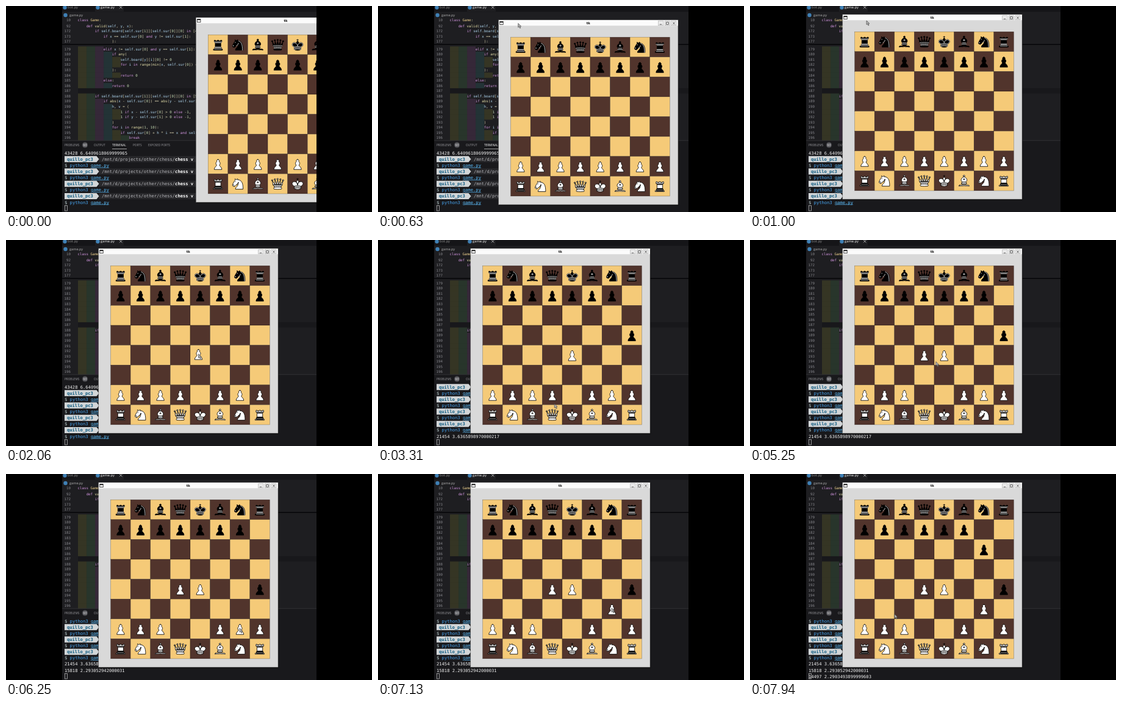
These frames come from a looping animation (600x338 px, 8 s). An HTML page:

```html
<!DOCTYPE html>
<html lang="en">
<head>
<meta charset="utf-8">
<title>Chess in a tk window</title>
<style>
  html, body { margin: 0; width: 100%; height: 100%; overflow: hidden; background: #000; }
  svg { display: block; width: 100vw; height: 100vh; }
  text { white-space: pre; }
  .code { font: 5.8px "DejaVu Sans Mono", monospace; }
  .term { font: 7.13px "DejaVu Sans Mono", monospace; }
  .ui { font-family: "Open Sans", sans-serif; }
</style>
</head>
<body>
<svg id="stage" viewBox="0 0 600 338">
  <clipPath id="screen"><rect x="92" width="417" height="338"/></clipPath>
  <clipPath id="panel"><rect x="92" y="236" width="417" height="102"/></clipPath>
  <g clip-path="url(#screen)">
    <g id="editor"></g>
    <g id="terminal" clip-path="url(#panel)"></g>
    <g id="win"></g>
    <path id="mouse" d="M0 0V6.6L1.6 5.2 2.9 8 4 7.5 2.8 4.8H4.9Z" fill="#b4b4b4" stroke="#4a4a4a" stroke-width=".7"/>
  </g>
</svg>
<script>
const LOOP = 8000;
const CELL = 32.6;
const $ = id => document.getElementById(id);
const rect = (x, y, w, h, fill, extra = '') =>
  `<rect x="${x}" y="${y}" width="${w}" height="${h}" fill="${fill}" ${extra}/>`;
const text = (x, y, s, fill, extra = '') =>
  `<text x="${x}" y="${y}" fill="${fill}" ${extra}>${s}</text>`;
const esc = s => s.replace(/&/g, '&amp;').replace(/</g, '&lt;').replace(/>/g, '&gt;');

/* Editor */
const STICKY = [
  [10, 0, 'class Game:'],
  [92, 4, 'def valid(self, y, x):'],
  [172, 8, 'if self.board[self.sur[1]][self.sur[0]][0] in [4, 5]:'],
  [173, 12, 'if x == self.sur[0] and y != self.sur[1]:'],
  [177, 16, '):']
];
const CODE = [
  [12, 'elif x != self.sur[0] and y == self.sur[1]:'],
  [16, 'if any('],
  [20, 'self.board[y][i][0] != 0'],
  [20, 'for i in range(min(x, self.sur[0]) + 1, 9)'],
  [16, '):'],
  [20, 'return 0'],
  [12, 'else:'],
  [16, 'return 0'],
  [0, ''],
  [8, 'if self.board[self.sur[1]][self.sur[0]][0] in [5, 3]:'],
  [12, 'if abs(x - self.sur[0]) == abs(y - self.sur[1]):'],
  [16, 'h, v = ('],
  [20, '1 if x - self.sur[0] > 0 else -1,'],
  [20, '1 if y - self.sur[1] > 0 else -1,'],
  [16, ')'],
  [16, 'for i in range(1, 10):'],
  [20, 'if self.sur[0] + h * i == x and self.sur[1]:'],
  [24, 'break']
];
const INDENT = ['255,255,64', '127,255,127', '255,127,255', '79,236,236'];

function tokenColor(s) {
  if (/^(class|def|if|elif|else|for|in|and|return|break)$/.test(s)) return '#cf93dc';
  if (/^(valid|any|range|min|abs)$/.test(s)) return '#e2dda8';
  if (s === 'Game') return '#ecd08c';
  if (/^\d/.test(s)) return '#c6dcb4';
  if (/^\w/.test(s)) return '#b0d6ee';
  return '#e0d8b4';
}
const paint = s => (s.match(/\w+|\s+|[^\w\s]+/g) || [])
  .map(k => `<tspan fill="${tokenColor(k)}">${esc(k)}</tspan>`).join('');

function codeLine(n, col, s, y) {
  return text(106, y + 2, n, '#85858a', 'class="code" text-anchor="end"') +
    text(117.6 + col * 3.51, y + 2, paint(s), '#ccc', 'class="code"');
}

function buildEditor() {
  const dot = (x, y) => `<circle cx="${x}" cy="${y}" r="3.2" fill="#3f80b5"/>`;
  let s = rect(92, 0, 417, 338, '#1e1e21') + rect(92, 0, 417, 9.5, '#151518') +
    rect(146, 0, 47, 9.5, '#1e1e21') + dot(96.5, 2.5) + dot(150.5, 2.5) + dot(97.5, 15) +
    text(101, 4.3, 'bot.py', '#8c8c8c', 'class="ui" font-size="5.8"') +
    text(155, 4.3, 'game.py', '#f0f0f0', 'class="ui" font-size="5.8"') +
    '<path d="M186 0l4.4 4.4M190.4 0L186 4.4" stroke="#ddd" stroke-width=".7"/>' +
    text(104, 17, 'game.py', '#b0b0b0', 'class="ui" font-size="5.6"');
  STICKY.forEach(([n, col, code], i) => {
    s += codeLine(n, col, code, i ? 24 + i * 8.5 : 23);
  });
  s += rect(92, 62.3, 417, 1.7, '#08080a');
  CODE.forEach(([col, code], i) => {
    const y = 70.6 + i * 8.58;
    for (let k = 0; k < col / 4; k++)
      s += rect(118 + k * 14.04, y - 4.3, 14.04, 8.6, `rgba(${INDENT[k % 4]},.1)`);
    if (!code) s += rect(118, y - 4.3, 391, 8.6, '#18181b');
    s += codeLine(179 + i, col, code, y);
  });
  s += rect(92, 221, 417, 117, '#19191c') + rect(92, 220.5, 417, .7, '#38383c');
  [[96, 'PROBLEMS'], [144, 'OUTPUT'], [174, 'TERMINAL'], [208, 'PORTS'], [233, 'EXPOSED PORTS']]
    .forEach(([x, label]) => {
      s += text(x, 230.2, label, label === 'TERMINAL' ? '#fff' : '#9c9ca0', 'class="ui" font-size="4.7"');
    });
  s += '<circle cx="129.5" cy="228" r="4.6" fill="#55555a"/>' +
    text(129.5, 229.8, '63', '#fff', 'class="ui" font-size="4.8" text-anchor="middle"') +
    rect(174, 234.2, 24, .7, '#d8d8d8');
  $('editor').innerHTML = s;
}

/* Terminal */
const prompt = y => rect(152, y - 5, 170, 10, '#28282b') +
  `<path d="M96 ${y - 5}H148.5L152.5 ${y}L148.5 ${y + 5}H96Z" fill="#d2d6d8"/>` +
  text(100, y + 2.4, 'quillo_pc3', '#0e5a80', 'font-weight="700"') +
  text(157, y + 2.4, '/mnt/d/projects/other/chess/<tspan fill="#fff" font-weight="700">chess v</tspan>', '#b4b4b8');
const command = y => text(96, y + 2.5,
  '$ <tspan fill="#46a4f0">python3</tspan> <tspan fill="#5cbcf8" text-decoration="underline">game.py</tspan>', '#b4c6c6');
const output = s => y => text(96, y + 2.5, s, '#f0f0f0');

const LINES = [
  output('43428 6.6409618069999965'),
  prompt, command, prompt, command, prompt, command, prompt, command,
  output('21454 3.6365898970000217'),
  output('15818 2.293052942000031'),
  output('14497 2.2903493899999603')
];
const REPLIES = [3150, 5480, 7900];
let shown = -1;

function drawTerminal(t) {
  const n = REPLIES.filter(r => t >= r).length;
  if (n === shown) return;
  shown = n;
  const first = Math.min(n, 2);
  $('terminal').innerHTML = '<g class="term">' +
    LINES.slice(first, 9 + n).map((line, i) => line(241.2 + i * 10.1)).join('') + '</g>' +
    rect(96.4, 327.6, 4, 8.4, 'none', 'stroke="#c8c8c8" stroke-width=".7"');
}

/* Chess pieces, each in a 45 unit box */
const shapes = {};
const piece = (name, body, detail = '') => { shapes[name] = { body, detail }; };
const ball = (x, y, r) => `M${x - r} ${y}a${r} ${r} 0 1 1 ${2 * r} 0a${r} ${r} 0 1 1 ${-2 * r} 0z`;

piece('p', 'M22.5 9c-2.2 0-4 1.8-4 4 0 .9.3 1.7.8 2.4C17.3 16.5 16 18.6 16 21c0 2 .9 3.8 2.4 5C17.6 30.5 11 32 11 39.5H34c0-7.5-6.6-9-7.4-13.5C28.1 24.8 29 23 29 21c0-2.4-1.3-4.5-3.3-5.6.5-.7.8-1.5.8-2.4 0-2.2-1.8-4-4-4z');
piece('r', 'M9 39h27v-3H9zM12 36v-4h21v4zM12.5 32l1.5-2.5h17l1.5 2.5zM14 29.5V17h17v12.5zM14 17l-3-3V9h4v2h5V9h5v2h5V9h4v5l-3 3z',
  'M12 35.5h21M13 31.5h19M14 29.5h17M14 16.5h17M11 14h23');
piece('n', 'M22 10c10.5 1 16.5 8 16 29H15c0-9 10-6.5 8-21L24 18c.4 2.9-5.5 7.4-8 9-3 2-2.8 4.3-5 4-1-1 1.4-3 0-3-1 0 .2 1.2-1 2-1 0-4 1-4-4 0-2 6-12 6-12s1.9-1.9 2-3.5c-.7-1-.5-2-.5-3 1-1 3 2.5 3 2.5h2s.8-2 2.5-3c1 0 1 3 1 3z',
  ball(9, 25.5, .5) + 'M15 15l-.8 1.3M24 18c.3 2.5-3 5.5-6 7.6');
piece('b', 'M9 36c3.4-1 10 .4 13.5-2 3.4 2.4 10 1 13.5 2 0 0 1.6.5 3 2-.7 1-1.6 1-3 .5-3.4-1-10 .5-13.5-1-3.4 1.5-10 0-13.5 1-1.3.5-2.3.5-3-.5 1.3-1.5 3-2 3-2zM15 32c2.5 2.5 12.5 2.5 15 0 .5-1.5 0-2 0-2 0-2.5-2.5-4-2.5-4 5.5-1.5 6-11.5-5-15.5-11 4-10.5 14-5 15.5 0 0-2.5 1.5-2.5 4 0 0-.5.5 0 2z' + ball(22.5, 8, 2.5),
  'M17.5 26h10M15 30h15M22.5 15.5v5M20 18h5');
piece('q', 'M9 26c8.5-1.5 21-1.5 27 0l2.5-12.5L31 25l-.3-14.1-5.2 13.6-3-14.5-3 14.5-5.2-13.6L14 25 6.5 13.5zM9 26c0 2 1.5 2 2.5 4 1 1.5 1 1 .5 3.5-1.5 1-1 2.5-1 2.5-1.5 1.5 0 2.5 0 2.5 6.5 1 16.5 1 23 0 0 0 1.5-1 0-2.5 0 0 .5-1.5-1-2.5-.5-2.5-.5-2 .5-3.5 1-2 2.5-2 2.5-4-8.5-1.5-18.5-1.5-27 0z' +
  ball(6, 12, 2) + ball(14, 9, 2) + ball(22.5, 8, 2) + ball(31, 9, 2) + ball(39, 12, 2),
  'M9 26c8.5-1.5 18.5-1.5 27 0M11.5 30c3.5-1 18.5-1 22 0M12 33.5c6-1 15-1 21 0');
piece('k', 'M22.5 11.6V6M20 8h5M22.5 25s4.5-7.5 3-10.5c0 0-1-2.5-3-2.5s-3 2.5-3 2.5c-1.5 3 3 10.5 3 10.5M12.5 37c5.5 3.5 14.5 3.5 20 0v-7s9-4.5 6-10.5c-4-6.5-13.5-3.5-16 4V27v-3.5c-2.5-7.5-12-10.5-16-4-3 6 6 10.5 6 10.5z',
  'M12.5 30c5.5-3 14.5-3 20 0M12.5 33.5c5.5-3 14.5-3 20 0M12.5 37c5.5-3 14.5-3 20 0');
const KING_TRIM = 'M32 29.5s8.5-4 6-9.6C34.1 14 25 18 22.5 24.5v2-2C20 18 10.9 14 7 19.9 4.5 25.5 13 29.5 13 29.5';
const KNIGHT_TRIM = 'M25 11.3c7 2 11.5 9 11.3 27.7';

const square = (c, r) => [(c + .5) * CELL, (r + .5) * CELL];

function pieceMarkup(type, white, c, r) {
  const { body, detail } = shapes[type];
  const trim = white ? '' : { k: KING_TRIM, n: KNIGHT_TRIM }[type] || '';
  const [x, y] = square(c, r);
  return `<g id="${white ? 'w' : 'b'}${c}${r}" transform="translate(${x} ${y})">` +
    '<g transform="scale(.54) translate(-22.5 -22.5)" stroke-width="1.5" stroke-linecap="round" stroke-linejoin="round">' +
    `<path d="${body}" fill="${white ? '#fff' : '#000'}" stroke="#000"/>` +
    `<path d="${detail + trim}" fill="none" stroke="${white ? '#000' : '#ececec'}"/></g></g>`;
}

function buildWindow() {
  let s = rect(1, 1.2, 294.4, 303, '#000', 'opacity=".45"') +
    rect(0, 0, 294.2, 303, '#d9d9d9', 'stroke="#6a6a6a" stroke-width=".5"') +
    rect(.3, .3, 293.6, 9, '#fbfbfb') +
    rect(2, 2.6, 5.4, 5, '#fff', 'stroke="#222" stroke-width=".8"') + rect(2, 2.6, 5.4, 1.6, '#222') +
    text(147, 7, 'tk', '#111', 'text-anchor="middle" font-family="DejaVu Sans, sans-serif" font-weight="700" font-size="5.3"');
  [262, 272.5, 283].forEach(x => {
    s += rect(x, 1.8, 8.2, 7, '#ececec', 'stroke="#999" stroke-width=".5"');
  });
  s += '<path d="M264 7.2h3.4M274.8 3.6h3.8v3.6h-3.8zM285.4 3.6l3.6 3.6M289 3.6l-3.6 3.6" fill="none" stroke="#222" stroke-width=".7"/>';
  s += '<g transform="translate(19.8 28.2)">';
  for (let i = 0; i < 64; i++) {
    const c = i % 8, r = i >> 3;
    s += rect(c * CELL, r * CELL, CELL, CELL, (c + r) % 2 ? '#51342c' : '#f5ca78', 'stroke="#000" stroke-opacity=".45" stroke-width=".5"');
  }
  [...'rnbqkbnr'].forEach((type, c) => {
    s += pieceMarkup(type, false, c, 0) + pieceMarkup('p', false, c, 1) +
      pieceMarkup('p', true, c, 6) + pieceMarkup(type, true, c, 7);
  });
  $('win').innerHTML = s + '</g>';
}

/* Motion */
const WINDOW = [[60, 311.5, 19], [630, 198, 23], [810, 151.8, 14]];
const MOUSE = [
  [60, 345, 26], [630, 230, 28.5], [810, 191, 24], [1050, 191, 24],
  [1600, 317, 252], [1700, 317, 252], [2040, 315.5, 187], [2300, 315.5, 187],
  [2900, 300, 250], [3600, 283, 280], [4300, 283, 280], [4420, 286, 252],
  [4800, 286, 187], [5000, 286, 187], [5700, 350, 230], [6150, 383, 253],
  [6600, 383, 253], [6960, 383, 220], [7150, 383, 220], [7750, 237, 230]
];
const DRAGS = [
  { id: 'w46', from: [4, 6], to: [4, 4], grab: 1700, drop: 2200 },
  { id: 'w36', from: [3, 6], to: [3, 4], grab: 4430, drop: 4860 },
  { id: 'w66', from: [6, 6], to: [6, 5], grab: 6620, drop: 7040 }
];
const JUMPS = [
  { id: 'b71', from: [7, 1], stops: [[REPLIES[0], 7, 3], [REPLIES[1], 7, 4]] },
  { id: 'b61', from: [6, 1], stops: [[REPLIES[2] - 40, 6, 2]] }
];

function follow(keys, t, ease = p => p) {
  const i = keys.findIndex(k => k[0] > t);
  if (i === 0) return keys[0].slice(1);
  if (i < 0) return keys[keys.length - 1].slice(1);
  const [t0, x0, y0] = keys[i - 1], [t1, x1, y1] = keys[i];
  const p = ease((t - t0) / (t1 - t0));
  return [x0 + (x1 - x0) * p, y0 + (y1 - y0) * p];
}
const smooth = p => p * p * (3 - 2 * p);
const place = (id, [x, y]) => $(id).setAttribute('transform', `translate(${x.toFixed(2)} ${y.toFixed(2)})`);

function render(t) {
  const win = follow(WINDOW, t);
  const mouse = follow(MOUSE, t, t > 810 ? smooth : undefined);
  place('win', win);
  place('mouse', mouse);
  $('mouse').style.display = t < 60 ? 'none' : '';
  for (const d of DRAGS) {
    const held = [mouse[0] - win[0] - 19.8, mouse[1] - win[1] - 28.2];
    place(d.id, t < d.grab ? square(...d.from) : t < d.drop ? held : square(...d.to));
  }
  for (const j of JUMPS) {
    const stop = j.stops.filter(s => t >= s[0]).pop();
    place(j.id, square(...(stop ? stop.slice(1) : j.from)));
  }
  drawTerminal(t);
}

buildEditor();
buildWindow();
const start = performance.now();
function tick() {
  render((performance.now() - start) % LOOP);
  requestAnimationFrame(tick);
}
tick();
</script>
</body>
</html>
```
